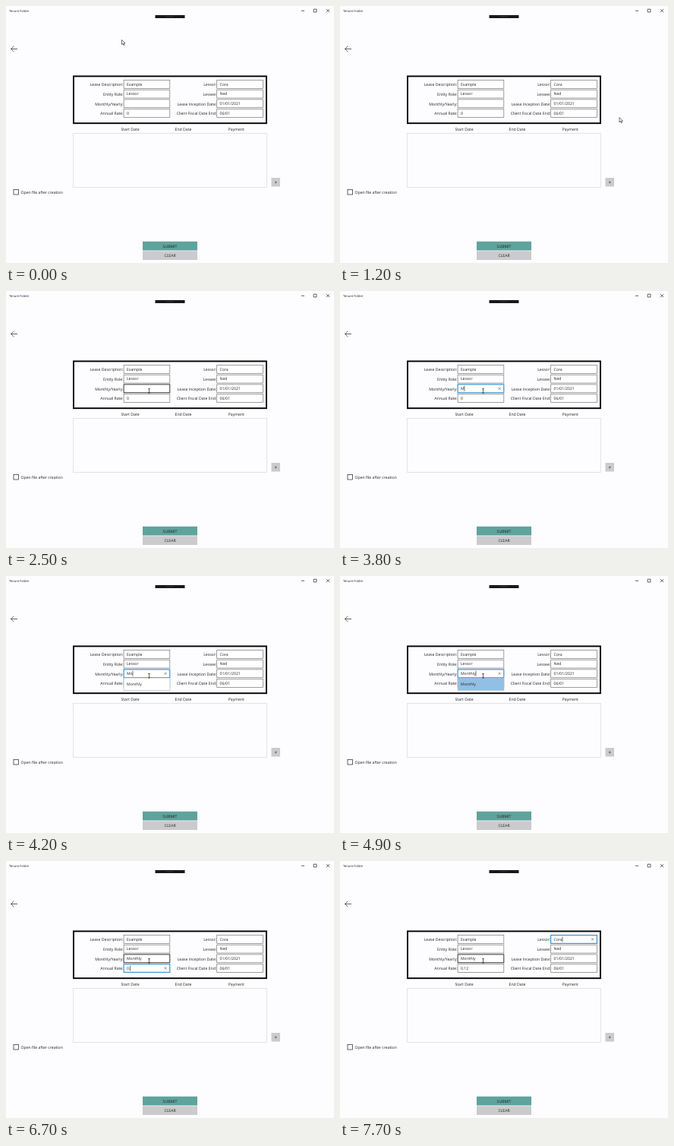
An HTML page for the animation above (8 s loop, 432x338 px).

```html
<!DOCTYPE html>
<html lang="en">
<head>
<meta charset="utf-8">
<title>Lease form</title>
<style>
  html, body { margin: 0; width: 100%; height: 100%; overflow: hidden; background: #fdfcfe; }
  svg { display: block; width: 100vw; height: 100vh; }
  text { font: 5.15px "Open Sans", "Noto Sans", sans-serif; fill: #222; text-rendering: geometricPrecision; white-space: pre; }
  .end { text-anchor: end; }
  .mid { text-anchor: middle; }
  .line { fill: none; stroke: #222; stroke-width: .7; }
</style>
</head>
<body>
<svg id="stage" viewBox="0 0 432 338">
  <rect width="432" height="338" fill="#fdfcfe"/>
  <text x="4" y="7.7" style="font-size:4.1px">Tenure Folder</text>
  <path class="line" d="M389 6.3h4M405.2 4.2h3.8v3.8h-3.8zM422 4.2l4 4m0-4l-4 4"/>
  <rect x="196.5" y="12" width="39" height="4" fill="#181818"/>
  <path d="M211 14h10" stroke="#555" stroke-width=".8" stroke-dasharray="1.2 .8"/>
  <path class="line" stroke-width=".8" d="M15 56.5H6.6m3.8-3.8l-3.8 3.8 3.8 3.8"/>
  <rect x="89" y="92.4" width="254" height="61.8" fill="none" stroke="#000" stroke-width="1.9"/>
  <g id="form"></g>
  <text class="mid" x="163.5" y="163.8">Start Date</text>
  <text class="mid" x="233.5" y="163.8">End Date</text>
  <text class="mid" x="303.3" y="163.8">Payment</text>
  <rect x="88.5" y="167.5" width="255" height="71" fill="none" stroke="#dedde0" stroke-width=".8"/>
  <rect x="349.5" y="226" width="11.5" height="11.5" fill="#cbcacc"/>
  <path d="M353.9 231.9h2.8m-1.4-1.4v2.8" stroke="#333" stroke-width=".6"/>
  <rect class="line" x="10" y="241.4" width="6.4" height="6.6"/>
  <text x="19.5" y="246.8">Open file after creation</text>
  <rect x="180" y="309.7" width="72" height="11.8" fill="#5fa39d"/>
  <text class="mid" x="216" y="317.7">SUBMIT</text>
  <rect x="180" y="322.3" width="72" height="11.7" fill="#cbcacc"/>
  <text class="mid" x="216" y="330.2">CLEAR</text>
  <g id="menu">
    <rect id="menuBox" x="155.1" y="134" width="60.8" height="16.3" stroke="#a9b9c6" stroke-width=".6"/>
    <text x="159" y="144">Monthly</text>
  </g>
  <path id="arrow" d="M0 0v6.2l1.5-1.4 1 2.3 1-.4-1-2.2h2z" fill="#fff" stroke="#111" stroke-width=".6"/>
  <path id="beam" d="M-1.3-2.8h2.6M0-2.8v5.6M-1.3 2.8h2.6" fill="none" stroke="#222" stroke-width=".7"/>
</svg>
<script>
const LOOP = 8000;
const byId = id => document.getElementById(id);
const NS = "http://www.w3.org/2000/svg";

function add(tag, attrs, content = "") {
  const node = document.createElementNS(NS, tag);
  for (const [key, value] of Object.entries(attrs)) node.setAttribute(key, value);
  node.textContent = content;
  return byId("form").appendChild(node);
}

function makeField(label, value, column, row) {
  const x = column ? 277.7 : 155.1;
  const y = 97.6 + row * 12.65;
  add("text", { class: "end", x: x - .5, y: y + 7.7 }, label);
  const box = add("rect", { x, y, width: 60.7, height: 10.8, fill: "#fff" });
  const mark = add("rect", { x: x + 3.6, y: y + 1.5, width: 3.8, height: 8, fill: "#0078d7" });
  const text = add("text", { x: x + 3.8, y: y + 7.2 }, value);
  const caret = add("path", { stroke: "#111", "stroke-width": .6 });
  const clear = add("path", {
    d: `M${x + 53.4} ${y + 3.9}l3 3m0-3l-3 3`, stroke: "#555", "stroke-width": .6
  });
  return { x, y, value, box, mark, text, caret, clear };
}

const fields = [
  ["Lease Description:", "Example"], ["Entity Role:", "Lessor"],
  ["Monthly/Yearly:", ""], ["Annual Rate:", "0"],
  ["Lessor:", "Cora"], ["Lessee:", "Ned"],
  ["Lease Inception Date:", "01/01/2021"], ["Client Fiscal Date End:", "06/01"]
].map(([label, value], i) => makeField(label, value, i >> 2, i % 4));

// Each table row: start time, then the values that hold from there.
const pointer = [
  [0, 152.5, 44.5], [100, 144, 45.5], [200, 136.5, 46.7],
  [1200, 368, 146.7], [1300, 365, 145], [1700, 350, 141],
  [1800, 318, 137], [1900, 280, 133], [2000, 248, 130],
  [2100, 224, 128.5], [2200, 212.2, 128.5], [2300, 203, 129.3],
  [2400, 194, 130.4], [2500, 188.5, 131.3]
];
const focus = [[0, -1], [2800, 2], [5800, 3], [7700, 4]];
const period = [[0, ""], [3800, "M"], [4000, "Mo"], [4900, "Monthly"]];
const rate = [[0, "0"], [6700, "0."], [6900, "0.1"], [7000, "0.12"]];
const menuFade = [[0, 0], [4000, .4], [4100, .8], [4200, 1], [5200, 0]];

const at = (table, t) => table.findLast(row => row[0] <= t).slice(1);
const show = (node, on) => node.setAttribute("visibility", on ? "visible" : "hidden");

function drawField(field, focused, hovered, selected) {
  const { x, y, box, mark, text, caret, clear } = field;
  text.textContent = field.value;
  text.style.fill = selected ? "#fff" : "#222";
  box.setAttribute("stroke", focused ? "#2c8fc6" : hovered ? "#222" : "#777");
  box.setAttribute("stroke-width", focused ? 1.1 : hovered ? .9 : .7);
  show(mark, selected);
  show(clear, focused && field.value);
  show(caret, focused && !selected);
  const end = x + 4.1 + (field.value ? text.getComputedTextLength() : 0);
  caret.setAttribute("d", `M${end} ${y + 1.9}v7`);
}

function draw(t) {
  const [px, py] = at(pointer, t);
  const [active] = at(focus, t);
  const [opacity] = at(menuFade, t);
  fields[2].value = at(period, t)[0];
  fields[3].value = at(rate, t)[0];

  const over = fields.findIndex(f => px > f.x && px < f.x + 60.7 && py > f.y && py < f.y + 10.8);
  fields.forEach((f, i) => drawField(f, i === active, i === over, i === 3 && t >= 5800 && t < 6000));

  byId("menu").setAttribute("opacity", opacity);
  byId("menuBox").setAttribute("fill", t >= 4900 ? "#92c0e4" : "#fff");
  for (const id of ["arrow", "beam"]) {
    byId(id).setAttribute("transform", `translate(${px} ${py})`);
    show(byId(id), (id === "beam") === (over >= 0));
  }
}

const start = performance.now();
function tick() {
  draw((performance.now() - start) % LOOP);
  requestAnimationFrame(tick);
}
tick();
</script>
</body>
</html>
```
